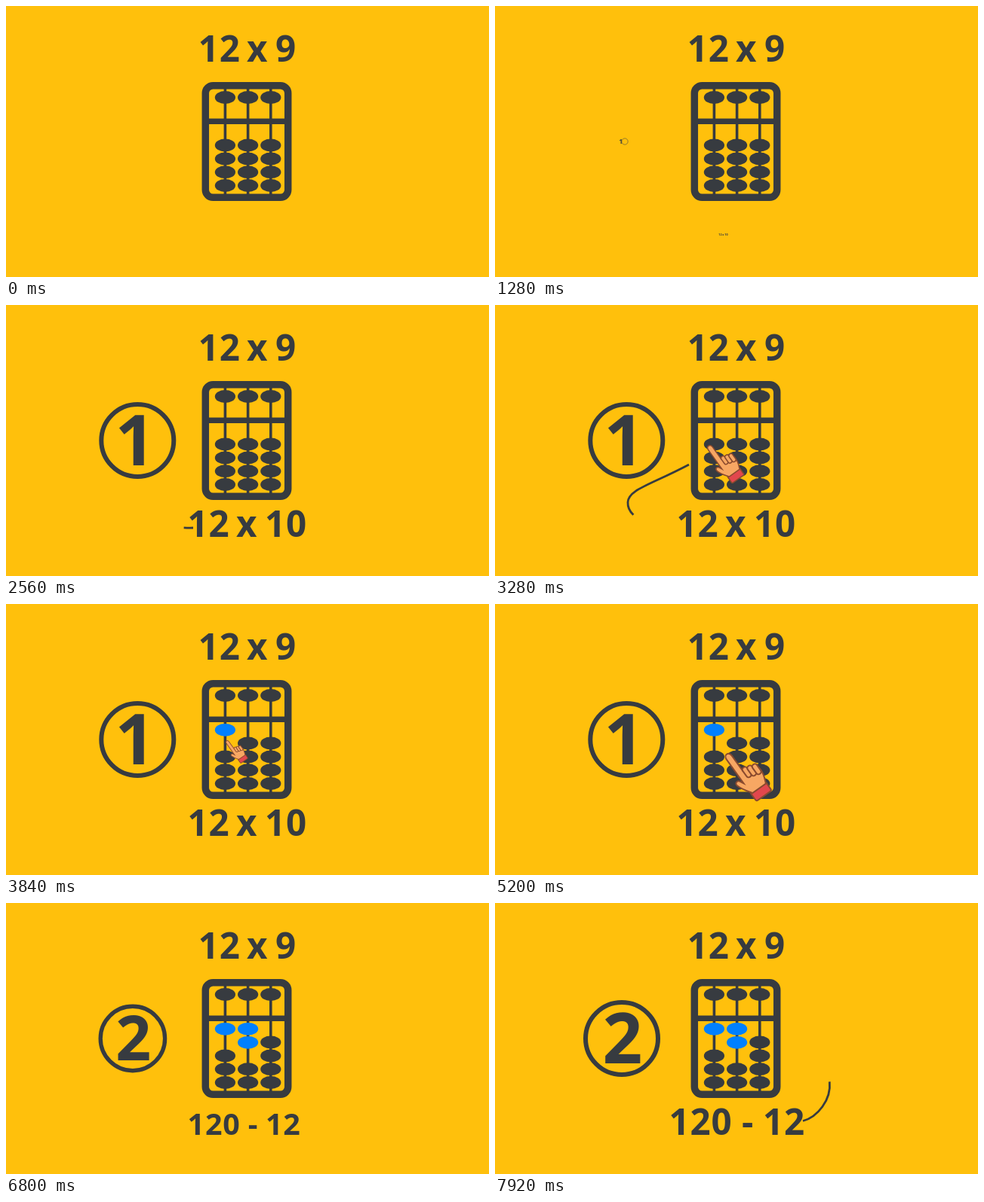
An HTML page with a canvas for the animation above (8 s loop, 640x360 px).

```html
<!DOCTYPE html>
<html lang="en">
<head>
<meta charset="utf-8">
<title>12 x 9</title>
<style>
html, body { margin: 0; width: 100%; height: 100%; overflow: hidden; background: #ffc00c; }
canvas { display: block; width: 640px; height: 360px; }
</style>
</head>
<body>
<canvas id="stage" width="640" height="360"></canvas>
<script>
const ctx = document.getElementById('stage').getContext('2d');
const LOOP = 8000, STEP = 80;
const YELLOW = '#ffc00c', DARK = '#373b40', BLUE = '#0080ff';
const FONT = '"Open Sans", "Noto Sans", sans-serif';

const clamp = v => Math.min(1, Math.max(0, v));
const ramp = (t, from, to) => clamp((t - from) / (to - from));
const smooth = u => u * u * (3 - 2 * u);
const mix = (a, b, u) => a + (b - a) * u;

// Scale that shoots past 1, dips below it and settles
function pop(u, high, low) {
  if (u <= 0) return 0;
  if (u < 160) return mix(0, high, u / 160);
  if (u < 320) return mix(high, low, u / 160 - 1);
  if (u < 480) return mix(low, 1, u / 160 - 2);
  return 1;
}

function scaled(x, y, s, draw) {
  if (s <= 0) return;
  ctx.save();
  ctx.translate(x, y);
  ctx.scale(s, s);
  ctx.translate(-x, -y);
  draw();
  ctx.restore();
}

// Words are placed by the left and right limits of their ink
function word(str, left, right, base, size = 47.5) {
  ctx.font = `700 ${size}px ${FONT}`;
  ctx.letterSpacing = size < 60 ? '1px' : '0px';
  ctx.fillStyle = DARK;
  const m = ctx.measureText(str);
  const mid = (m.actualBoundingBoxRight - m.actualBoundingBoxLeft) / 2;
  ctx.fillText(str, (left + right) / 2 - mid, base);
}

function rod(x, beads) {
  ctx.fillStyle = DARK;
  ctx.fillRect(x - 1.8, 106, 3.6, 148);
  for (const [y, color] of beads) {
    ctx.fillStyle = color;
    ctx.beginPath();
    ctx.ellipse(x, y, 13.6, 8.4, 0, 0, 7);
    ctx.fill();
  }
}

function abacus(first, second) {
  const rows = [185, 203, 220.7, 238.5];
  const lifts = [[1, first], [2, second], [0, 0]];
  lifts.forEach(([count, u], i) => {
    const lower = rows.map((y, k) => k < count && u > 0 ? [y - 17.7 * u, BLUE] : [y, DARK]);
    rod(290.4 + i * 30.2, [[121.5, DARK], ...lower]);
  });
  ctx.fillStyle = DARK;
  ctx.fillRect(265, 149.5, 108, 7.5);
  ctx.strokeStyle = DARK;
  ctx.lineWidth = 9.5;
  ctx.beginPath();
  ctx.roundRect(264.3, 105.8, 109.4, 148.4, 10);
  ctx.stroke();
}

function badge(digit, cx, ringX, inkLeft, inkRight, s) {
  scaled(ringX, 180, s, () => {
    ctx.strokeStyle = DARK;
    ctx.lineWidth = 6;
    ctx.beginPath();
    ctx.arc(cx, 180, 48, 0, 7);
    ctx.stroke();
  });
  scaled(166.5, 180, s, () => word(digit, inkLeft, inkRight, 213, 92.5));
}

function box(x, y, w, h, r, color) {
  ctx.fillStyle = color;
  ctx.beginPath();
  ctx.roundRect(x, y, w, h, r);
  ctx.fill();
  ctx.stroke();
}

function hand(x, y, s) {
  if (s <= 0) return;
  const skin = '#f7a763';
  ctx.save();
  ctx.translate(x, y);
  ctx.scale(s, s);
  ctx.rotate(-0.62);
  ctx.strokeStyle = '#8a4a2e';
  ctx.lineWidth = 1.8;
  box(-11, 19, 23, 13, 2, '#e2474d');
  ctx.fillStyle = skin;
  ctx.beginPath();
  ctx.moveTo(-9, 21);
  ctx.bezierCurveTo(-13, 15, -17, 10, -19, 3);
  ctx.bezierCurveTo(-20, -2, -15, -3, -13, 1);
  ctx.lineTo(-11, 5);
  ctx.lineTo(-11, -31);
  ctx.bezierCurveTo(-11, -38, -3, -38, -3, -31);
  ctx.lineTo(-3, -8);
  ctx.lineTo(14, -4);
  ctx.bezierCurveTo(18, 6, 14, 14, 11, 21);
  ctx.closePath();
  ctx.fill();
  ctx.stroke();
  for (let i = 0; i < 3; i++) box(-3 + i * 6, -11 + i * 2, 6.4, 14, 3, skin);
  ctx.restore();
}

// One push: pop in, move up, shrink away
function push(t, start, x, y) {
  const lift = smooth(ramp(t, start + 440, start + 770));
  const out = 1 - ramp(t, start + 804, start + 979);
  hand(x, y - 14 * lift, pop(t - start, 1.37, 0.85) * out);
}
const lifted = (t, start) => smooth(ramp(t, start + 440, start + 770));

function curve(d) {
  const el = document.createElementNS('http://www.w3.org/2000/svg', 'path');
  el.setAttribute('d', d);
  return { path: new Path2D(d), len: el.getTotalLength() };
}
const leftArc = curve('M248 296C200 297 175 280 176 262C177 245 204 240 257 212');
const rightArc = curve('M408 289.5C428 284 447 260 443 235C440 213 410 203 374 204');

function arc({ path, len }, head, tail) {
  if (head <= tail) return;
  ctx.save();
  ctx.strokeStyle = DARK;
  ctx.lineWidth = 2.8;
  ctx.setLineDash([(head - tail) * len, len * 2]);
  ctx.lineDashOffset = -tail * len;
  ctx.stroke(path);
  ctx.restore();
}
const drawn = (t, start) => 1 - (1 - ramp(t, start, start + 360)) ** 2;

const POP1 = 1271, POP2 = 6440, PUSH1 = 2951, PUSH2 = 4951;

function stepOne(t) {
  if (t >= 6400 || (t >= 4160 && t < 4240)) return;
  badge('1', 174.3, 171.8, 149, 184, pop(t - POP1, 1.53, 0.853));
  scaled(301, 305, pop(t - POP1, 1.37, 0.773), () => {
    word('12', 243, 294, 308);
    word('x', 307, 331, 308);
    word('10', 345, 397, 308);
  });
}

function stepTwo(t) {
  badge('2', 168, 167, 147, 191, pop(t - POP2, 1.53, 0.853));
  scaled(290.5, 307, pop(t - POP2, 1.37, 0.773), () => {
    word('120', 232, 313, 308);
    word('-', 328, 341, 308);
    word('12', 358, 408, 308);
  });
}

function render(t) {
  ctx.fillStyle = YELLOW;
  ctx.fillRect(0, 0, 640, 360);
  word('12', 257.5, 308, 74);
  word('x', 321, 345, 74);
  word('9', 358, 383, 74);
  abacus(lifted(t, PUSH1), lifted(t, PUSH2));
  stepOne(t);
  stepTwo(t);
  arc(leftArc, drawn(t, 2548), ramp(t, 3140, 3520));
  arc(rightArc, drawn(t, 7828), 0);
  push(t, PUSH1, 306, 209);
  push(t, PUSH2, 336, 227);
}

function frame() {
  const t = performance.now() % LOOP;
  render(t - t % STEP);
  requestAnimationFrame(frame);
}
frame();
</script>
</body>
</html>
```
